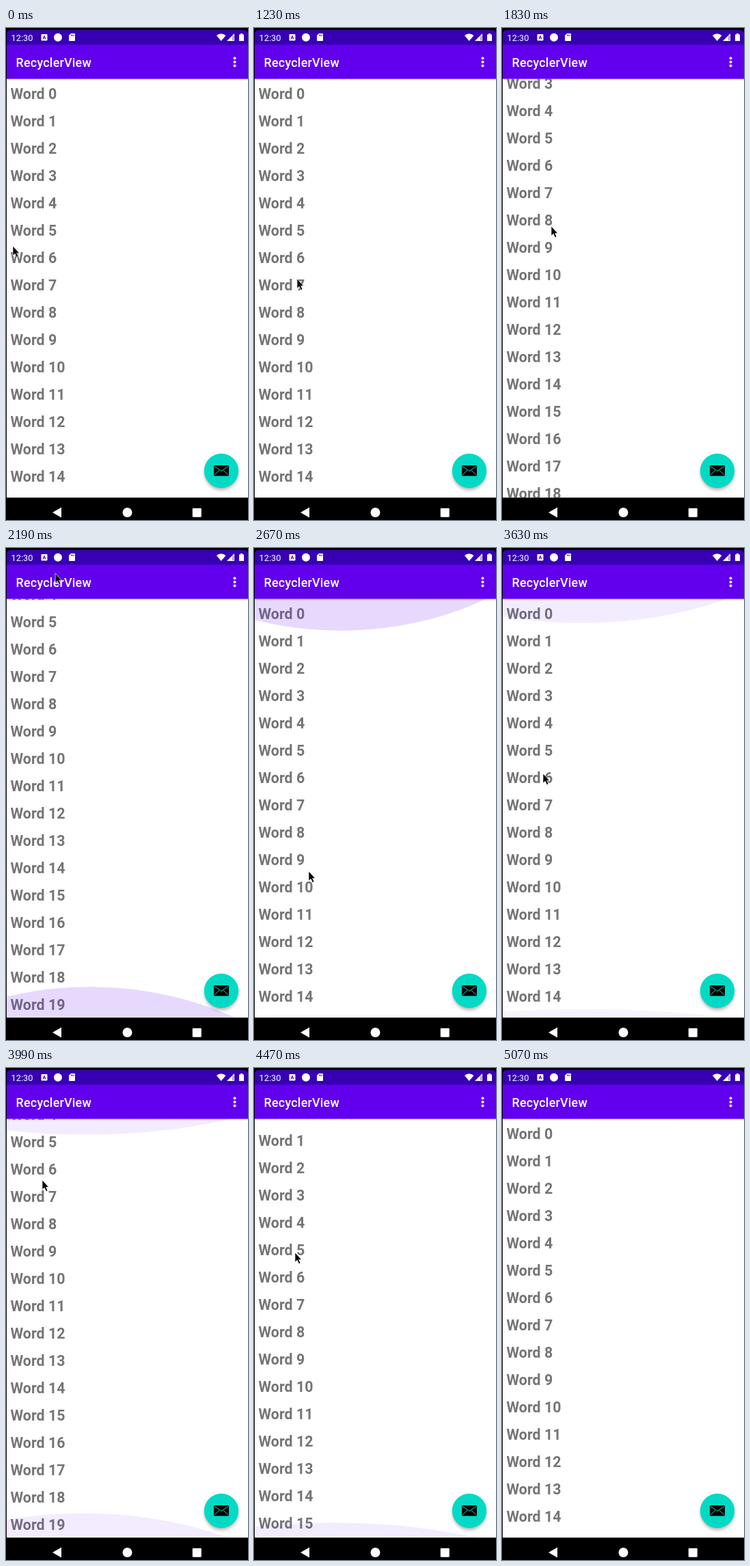
An HTML page that plays this animation: 354x720 px, repeating every 5.56 s.

```html
<!DOCTYPE html>
<html lang="en">
<head>
<meta charset="utf-8">
<title>RecyclerView</title>
<style>
  html, body { margin: 0; width: 100%; height: 100%; overflow: hidden; background: #000; }
  svg { display: block; }
  text { font-family: Roboto, "Open Sans", sans-serif; fill: #fff; }
  #rows text { font-size: 21.4px; font-weight: 700; fill: #757575; }
</style>
</head>
<body>
<svg width="100%" height="100%" viewBox="0 0 354 720">
  <defs>
    <linearGradient id="shade" x2="0" y2="1">
      <stop stop-color="#000" stop-opacity=".16"/>
      <stop offset="1" stop-color="#000" stop-opacity="0"/>
    </linearGradient>
    <filter id="blur" x="-30%" y="-30%" width="160%" height="160%"><feGaussianBlur stdDeviation="2.4"/></filter>
  </defs>

  <rect width="354" height="720"/>
  <rect x="1" y="74" width="353" height="613.5" fill="#fff"/>

  <!-- list with its overscroll glows -->
  <svg x="1" y="74.5" width="353" height="613" overflow="hidden">
    <g id="rows"></g>
    <ellipse class="glow" rx="424" fill="#6200ee"/>
    <ellipse class="glow" rx="424" fill="#6200ee"/>
  </svg>
  <rect x="1" y="74.5" width="353" height="2.5" fill="url(#shade)"/>

  <!-- status bar and toolbar -->
  <path d="M1 25V9Q1 3 7 3H348Q354 3 354 9V25Z" fill="#3700b3"/>
  <rect x="1" y="24.5" width="353" height="50" fill="#6200ee"/>
  <text x="7.6" y="18.5" font-size="12.8">12:30</text>
  <g fill="#fff">
    <rect x="51.5" y="9" width="9" height="9.5" rx="1"/>
    <path d="M54 16.3L56 11.2L58 16.3M54.8 14.8H57.2" fill="none" stroke="#3700b3"/>
    <circle cx="76" cy="13.8" r="6"/>
    <path d="M95 8H100Q101 8 101 9V18Q101 19 100 19H93Q92 19 92 18V11Z"/>
    <path d="M95.5 9.5V12M97.3 9.5V12M99.1 9.5V12" stroke="#3700b3" stroke-width=".9"/>
    <path d="M308 11Q314.7 5.6 321.5 11L314.7 19Z"/>
    <path d="M334 8V19H323Z"/>
    <path d="M331.5 11.5V18H333V11.5Z" fill="#3700b3" opacity=".6"/>
    <path d="M341 9.5H343V8H346V9.5H348V19H341Z"/>
    <circle cx="334.5" cy="44.3" r="2"/>
    <circle cx="334.5" cy="49.8" r="2"/>
    <circle cx="334.5" cy="55.3" r="2"/>
  </g>
  <text x="14.6" y="56.5" font-size="17.9" font-weight="500" letter-spacing=".0125em">RecyclerView</text>

  <!-- floating button -->
  <circle cx="315" cy="651.5" r="24.5" opacity=".3" filter="url(#blur)"/>
  <circle cx="315" cy="648" r="25.2" fill="#03dac5"/>
  <rect x="304" y="640" width="22" height="15.5" rx="1.5"/>
  <path d="M305 641.5L315 648.5L325 641.5M305 654L312 647.5M325 654L318 647.5" fill="none" stroke="#03dac5"/>

  <!-- navigation bar -->
  <rect y="687.5" width="354" height="32.5"/>
  <g fill="#fff">
    <path d="M68 709L81 701.5V716.5Z"/>
    <circle cx="177.5" cy="709" r="7"/>
    <rect x="272.8" y="702.8" width="13" height="13" rx="1"/>
  </g>

  <path id="cursor" d="M0 0V14.2L3.2 11.3L5.6 16.6L8 15.5L5.6 10.4H9.6Z" stroke="#fff" stroke-width=".7"/>
</svg>

<script>
const LOOP = 5560, START = 990, STEP = 120;
const VIEW = 613, MAX_SCROLL = 188;
const DRAG_FROM = 6, DRAG_TO = 30;

// pointer positions, one per step
const pointer = [
  [55, 322], [58, 344], [63, 367], [66, 386], [68, 401],
  [70, 425], [71, 395], [72, 290], [72, 160], [72, 61],
  [72, 37], [74, 75], [76, 200], [78, 365], [80, 473],
  [80, 455], [77, 365], [73, 245], [69, 140], [66, 84],
  [64, 100], [62, 195], [60, 330], [58, 413], [55, 300],
  [53, 164], [53, 118], [55, 112], [57, 175], [60, 270],
  [66, 345], [110, 390], [215, 420], [325, 440], null
];

const rows = document.getElementById("rows");
const cursor = document.getElementById("cursor");
const glows = document.querySelectorAll(".glow");

for (let i = 0; i < 20; i++) {
  const row = document.createElementNS("http://www.w3.org/2000/svg", "text");
  row.setAttribute("x", 5.4);
  row.setAttribute("y", 29.1 + 40 * i);
  row.textContent = "Word " + i;
  rows.append(row);
}

// A glow grows while its edge is pulled and recedes once the drag turns back.
function updateGlow(edge, pull, x) {
  if (pull > 0) {
    edge.over = (edge.age ? 0 : edge.over) + pull;
    edge.age = 0;
    edge.x = x;
  } else {
    edge.age++;
  }
  const part = edge.over / VIEW;
  const fade = edge.age ? Math.max(0, 1 - 0.2 * (edge.age - 0.65)) ** 2 : 1;
  const size = part ? Math.max(0, 1 - 1 / Math.sqrt(149 * part) / 0.7) : 0;
  return { x: edge.x, size: size * fade, alpha: Math.min(0.15, 0.8 * part) * fade };
}

function buildPoses() {
  const top = { over: 0, age: 1, x: 0 }, bottom = { over: 0, age: 1, x: 0 };
  let scroll = 0;
  return pointer.map((point, k) => {
    const dragging = k >= DRAG_FROM && k <= DRAG_TO;
    const wanted = dragging ? scroll + pointer[k - 1][1] - point[1] : scroll;
    const x = point ? point[0] : 0;
    scroll = Math.min(MAX_SCROLL, Math.max(0, wanted));
    return {
      point, scroll,
      glows: [updateGlow(top, -wanted, x), updateGlow(bottom, wanted - MAX_SCROLL, x)]
    };
  });
}

const poses = buildPoses();
const rest = point => ({ point, scroll: 0, glows: poses[0].glows });
const intro = [[370, rest([10, 319])], [490, rest([30, 314])], [START, rest([52, 310])]];

function poseAt(t) {
  const early = intro.find(([end]) => t < end);
  return early ? early[1] : poses[Math.min(poses.length - 1, Math.floor((t - START) / STEP))];
}

function draw(now) {
  const { point, scroll, glows: shapes } = poseAt(now % LOOP);
  rows.setAttribute("transform", `translate(0 ${-scroll})`);
  cursor.style.display = point ? "" : "none";
  if (point) cursor.setAttribute("transform", `translate(${point})`);
  shapes.forEach(({ x, size, alpha }, i) => {
    const glow = glows[i];
    glow.setAttribute("cx", 86 + x / 2);
    glow.setAttribute("cy", i ? VIEW + 367 * size : -367 * size);
    glow.setAttribute("ry", 424 * size);
    glow.setAttribute("opacity", alpha);
  });
}

const begin = performance.now();
function tick() {
  draw(performance.now() - begin);
  requestAnimationFrame(tick);
}
tick();
</script>
</body>
</html>
```
